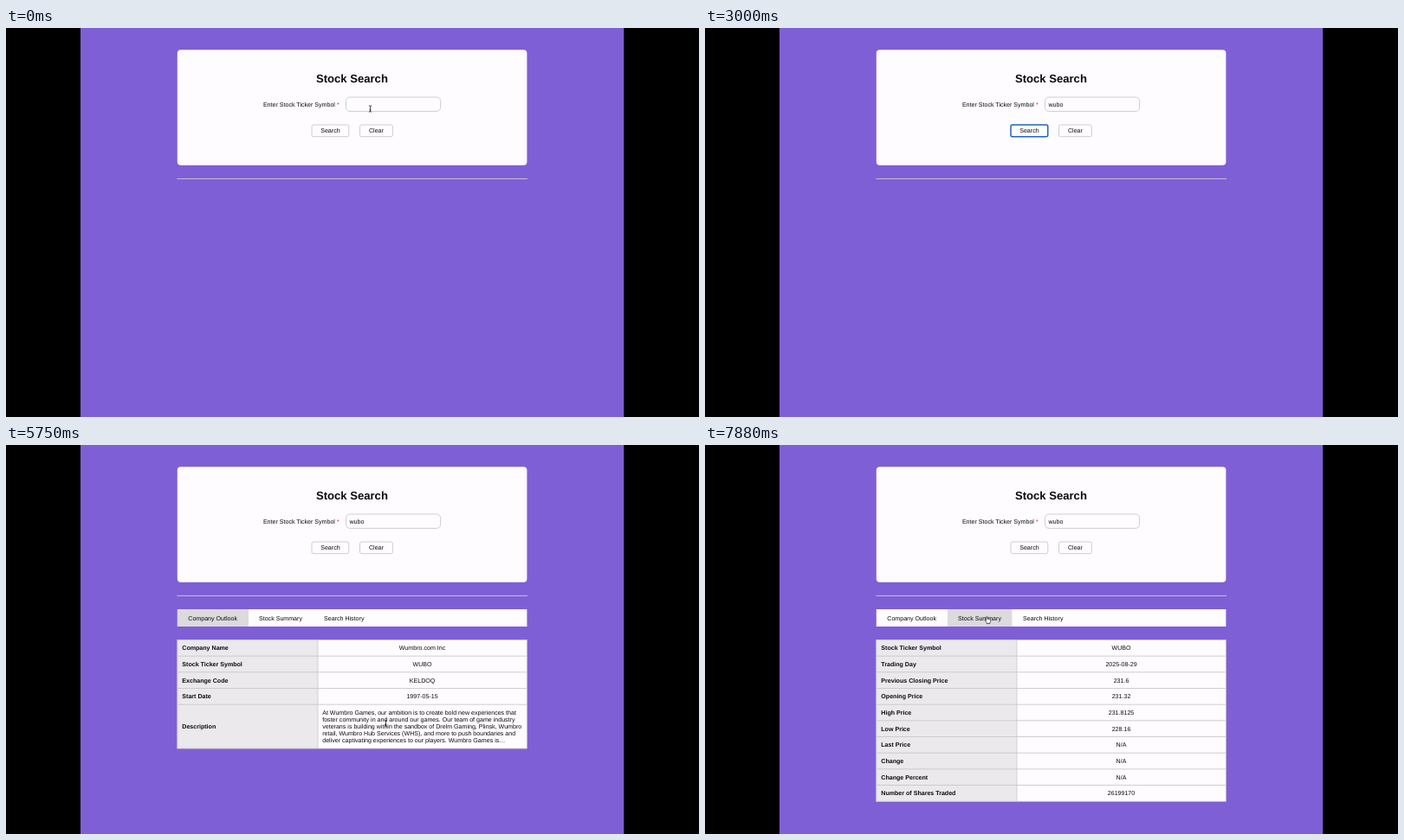
Animation of 800x450 px, one loop 8 s. Source, as an HTML page with a canvas:

```html
<!DOCTYPE html>
<html lang="en">
<head>
<meta charset="utf-8">
<title>Stock Search</title>
<style>
  html, body { margin: 0; width: 100%; height: 100%; overflow: hidden; background: #000; }
  canvas { display: block; width: 800px; height: 450px; }
</style>
</head>
<body>
<canvas id="stage" width="800" height="450"></canvas>
<script>
const ctx = document.getElementById('stage').getContext('2d');
const LOOP = 8000;
const FONT = '"Liberation Sans", Arial, sans-serif';
const WHITE = '#fffcff', INK = '#0c0a0e', LINE = '#cbc8cc', BLUE = '#1c66c4';
const ROW = 18.68, TABLE_TOP = 225.4;

const TABS = [
  ['Company Outlook', 198, 280, 210.3],
  ['Stock Summary', 280, 354.5, 292],
  ['Search History', 354.5, 426, 367]
];

const OUTLOOK = [
  ['Company Name', 'Wumbro.com Inc'],
  ['Stock Ticker Symbol', 'WUBO'],
  ['Exchange Code', 'KELDOQ'],
  ['Start Date', '1997-05-15'],
  ['Description', [
    'At Wumbro Games, our ambition is to create bold new experiences that',
    'foster community in and around our games. Our team of game industry',
    'veterans is building within the sandbox of Drelm Gaming, Plinsk, Wumbro',
    'retail, Wumbro Hub Services (WHS), and more to push boundaries and',
    'deliver captivating experiences to our players. Wumbro Games is…'
  ]]
];

const SUMMARY = [
  ['Stock Ticker Symbol', 'WUBO'],
  ['Trading Day', '2025-08-29'],
  ['Previous Closing Price', '231.6'],
  ['Opening Price', '231.32'],
  ['High Price', '231.8125'],
  ['Low Price', '228.16'],
  ['Last Price', 'N/A'],
  ['Change', 'N/A'],
  ['Change Percent', 'N/A'],
  ['Number of Shares Traded', '26199170']
];

const TYPED = [[0, ''], [1250, 'w'], [1380, 'wu'], [2000, 'wub'], [2250, 'wubo']];
const POINTER = [
  [0, 'beam', 420.5, 93.5], [130, 'beam', 421, 90.5], [1250, ''],
  [4250, 'arrow', 424, 118], [4380, 'arrow', 425, 138], [4500, 'arrow', 427, 165],
  [4630, 'arrow', 431, 196], [4750, 'arrow', 437, 224], [4880, 'arrow', 446, 241],
  [5000, 'beam', 456, 236], [5130, 'beam', 504, 236.5], [5250, 'beam', 546, 237],
  [5500, 'beam', 500, 284], [5630, 'beam', 460, 310], [5750, 'beam', 438.5, 322],
  [5880, 'beam', 415, 331], [6000, 'beam', 399, 333], [6130, 'beam', 397, 331],
  [6250, 'beam', 396, 327],
  [6380, 'beam', 370, 331], [6500, 'beam', 420, 342], [6630, 'beam', 498, 338],
  [6750, 'beam', 568, 331], [6880, 'arrow', 595, 317], [7000, 'arrow', 560, 294],
  [7130, 'arrow', 515.2, 272], [7250, 'arrow', 395.5, 231.5],
  [7500, 'hand', 338, 203], [7630, 'hand', 328, 199], [7750, 'hand', 325.5, 198.2]
];

function at(track, t) {
  let hit = track[0];
  for (const step of track) if (step[0] <= t) hit = step;
  return hit;
}

function rect(x0, y0, x1, y1, color) {
  ctx.fillStyle = color;
  ctx.fillRect(x0, y0, x1 - x0, y1 - y0);
}

function box(x0, y0, x1, y1, r, fill, stroke, width) {
  ctx.beginPath();
  ctx.roundRect(x0, y0, x1 - x0, y1 - y0, r);
  ctx.fillStyle = fill;
  ctx.fill();
  if (!stroke) return;
  ctx.strokeStyle = stroke;
  ctx.lineWidth = width;
  ctx.stroke();
}

function text(str, x, y, { size = 7.08, bold = false, align = 'left', color = INK } = {}) {
  ctx.font = `${bold ? 'bold ' : ''}${size}px ${FONT}`;
  ctx.textRendering = 'geometricPrecision';
  ctx.textAlign = align;
  ctx.fillStyle = color;
  ctx.fillText(str, x, y);
}

function button(label, x0, x1, focused) {
  box(x0, 112, x1, 125.7, 2, WHITE, focused ? BLUE : LINE, focused ? 1.5 : 0.9);
  text(label, (x0 + x1) / 2, 121.2, { align: 'center' });
}

function drawForm(t) {
  box(197.8, 25.3, 601.4, 158.7, 4, WHITE);
  text('Stock Search', 399.4, 62.6, { size: 13.1, bold: true, align: 'center' });
  text('Enter Stock Ticker Symbol', 296.9, 90.5);
  text('*', 382, 90.5, { color: '#d0343c' });

  const focused = t >= 250 && t < 2630;
  box(392.5, 80, 501.6, 96.4, 4.5, WHITE, focused ? BLUE : LINE, focused ? 1.5 : 0.9);
  const typed = at(TYPED, t)[1];
  text(typed, 396.5, 90.5);
  if (focused && (t < 880 || t >= 1250)) {
    const x = 396.2 + ctx.measureText(typed).width;
    rect(x, 84.3, x + 0.7, 92.6, INK);
  }

  button('Search', 353, 395.8, t >= 2630 && t < 4500);
  button('Clear', 408.5, 446.4, false);
  rect(197.5, 173.9, 602, 174.9, '#c9c2cf');
}

function drawTabs(active) {
  rect(197.8, 190, 601.4, 210, WHITE);
  TABS.forEach(([label, x0, x1, x], i) => {
    if (i === active) rect(x0, 190, x1, 210, '#dcdadd');
    text(label, x, 202.5);
  });
}

function drawTable(rows) {
  let y = TABLE_TOP;
  const edges = [y];
  for (const [, value] of rows) edges.push(y += Array.isArray(value) ? 50.9 : ROW);
  rect(197.8, TABLE_TOP, 601.4, y, WHITE);
  rect(197.8, TABLE_TOP, 360, y, '#ebe9ec');

  rows.forEach(([name, value], i) => {
    const base = (edges[i] + edges[i + 1]) / 2 + 2.6;
    text(name, 203.3, base, { bold: true });
    if (Array.isArray(value)) {
      value.forEach((line, k) => text(line, 365.2, base + (k - 2) * 8.1));
    } else {
      text(value, 480.5, base, { align: 'center' });
    }
  });

  for (const e of edges) rect(197.5, e - 0.4, 601.6, e + 0.5, LINE);
  for (const x of [197.8, 360, 601.3]) rect(x - 0.4, TABLE_TOP, x + 0.4, y, LINE);
}

const SHAPES = {
  beam() {
    ctx.beginPath();
    ctx.moveTo(-1.6, -3.7);
    ctx.quadraticCurveTo(0, -3.7, 0, -2.6);
    ctx.lineTo(0, 2.6);
    ctx.quadraticCurveTo(0, 3.7, -1.6, 3.7);
    ctx.moveTo(1.6, -3.7);
    ctx.quadraticCurveTo(0, -3.7, 0, -2.6);
    ctx.moveTo(0, 2.6);
    ctx.quadraticCurveTo(0, 3.7, 1.6, 3.7);
    ctx.moveTo(-1, 1.2);
    ctx.lineTo(1, 1.2);
    ctx.strokeStyle = '#222';
    ctx.lineWidth = 0.8;
    ctx.stroke();
  },
  arrow() {
    const p = new Path2D('M0 0V7L1.6 5.6 2.7 8.2 3.9 7.7 2.8 5.1H5Z');
    ctx.strokeStyle = '#fff';
    ctx.lineWidth = 1;
    ctx.stroke(p);
    ctx.fillStyle = '#111';
    ctx.fill(p);
  },
  hand() {
    const p = new Path2D('M-.7 .6Q0-.5 .7 .6V3Q1.5 2.5 2 3.2 2.8 2.8 3.2 3.5 4.4 3.3 4.4 4.5 4.4 6.3 3.4 7.2V8.4H-.2V7.3Q-1.5 6-2.3 4.5-2.2 3.6-1.3 4.1L-.7 4.8Z');
    ctx.fillStyle = '#fff';
    ctx.fill(p);
    ctx.strokeStyle = '#222';
    ctx.lineWidth = 0.75;
    ctx.stroke(p);
  }
};

function drawPointer(t) {
  const [, kind, x, y] = at(POINTER, t);
  if (!kind) return;
  ctx.save();
  ctx.translate(x, y);
  SHAPES[kind]();
  ctx.restore();
}

function draw(t) {
  rect(0, 0, 800, 450, '#000');
  rect(86, 0, 713.3, 450, '#7f5fd5');
  drawForm(t);
  if (t >= 3880) {
    const summary = t >= 7750;
    drawTabs(summary ? 1 : 0);
    drawTable(summary ? SUMMARY : OUTLOOK);
  }
  drawPointer(t);
}

const start = performance.now();
function tick() {
  draw((performance.now() - start) % LOOP);
  requestAnimationFrame(tick);
}
tick();
</script>
</body>
</html>
```
